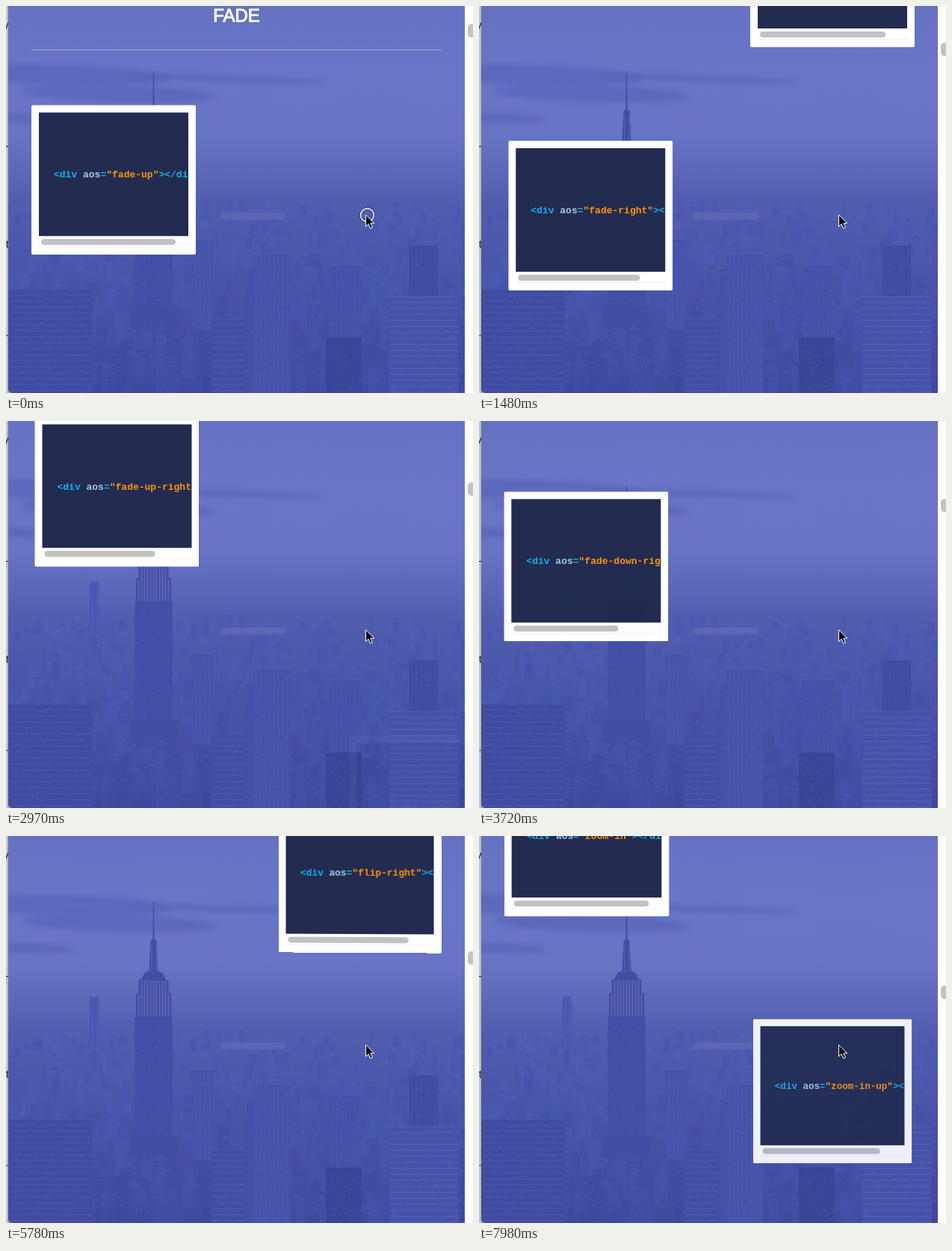
Recreate the animation shown at these times as an HTML page with a canvas. Size 625 by 517 pixels, loop 8000 ms.

```html
<!DOCTYPE html>
<html lang="en">
<head>
<meta charset="utf-8">
<title>Scroll animations</title>
<style>
  html, body { margin: 0; width: 100%; height: 100%; overflow: hidden; background: #fff; }
  #stage { position: relative; width: 625px; height: 517px; overflow: hidden; background: #fff; }
  #stage > *, #page > *, .card > * { position: absolute; }
  #edge { left: 0; top: 0; width: 12px; height: 517px; overflow: hidden;
    background: linear-gradient(90deg, #d2d2cb, #aeaeae 3px); font: 15px/18px "Liberation Sans", Arial, sans-serif; color: #222; }
  #edge span { position: absolute; right: 8px; }
  #city { left: 3px; top: 0; border-radius: 0 0 0 5px; }
  #page { left: 0; top: 0; width: 614px; height: 0; }
  .rule { left: 34px; width: 549px; height: 1px; background: rgba(255,255,255,.38); }
  .title { left: 34px; width: 549px; text-align: center; color: #fff;
    font: 24px/30px "Liberation Sans", Arial, sans-serif; -webkit-text-stroke: 1px #fff; }
  .card { width: 220px; height: 200px; background: #fff; border-radius: 2px; backface-visibility: hidden; }
  .code { left: 10px; top: 10px; width: 200px; height: 165px; overflow: hidden; background: #232b50; }
  .code pre { position: absolute; left: 20px; top: 76px; margin: 0; color: #12b2ee;
    font: bold 13px/15px "Liberation Mono", "Courier New", monospace; }
  .code b { color: #9fcbea; }
  .code i { color: #fb9408; font-style: normal; }
  .bar { left: 13px; top: 179px; height: 8px; border-radius: 4px; background: #c2c2c2; }
  .track { left: 10px; top: 189px; width: 200px; height: 1px; background: #f0f0f0; }
  #thumb { left: 618px; width: 12px; height: 18px; border-radius: 5px; background: #c3c3c3; }
  #pointer { left: 470px; top: 267px; }
</style>
</head>
<body>
<div id="stage">
  <div id="edge">
    <span style="top:18px">V</span><span style="top:183px">T</span>
    <span style="top:309px">t</span><span style="top:430px">·</span>
  </div>
  <canvas id="city" width="611" height="517"></canvas>
  <div id="page"></div>
  <div id="thumb"></div>
  <svg id="pointer" width="30" height="34">
    <g id="ring" fill="none"><circle cx="13.5" cy="12.5" r="10" stroke="#222a50"/><circle cx="13.5" cy="12.5" r="9" stroke="#fff" stroke-width="1.4"/></g>
    <path d="M11.5 12v15.5l3.6-3.3 2.5 6 2.8-1.2-2.5-5.8h4.8z" fill="#080808" stroke="#fff"/>
  </svg>
</div>
<script>
const $ = id => document.getElementById(id);
const page = $('page');

// ---------- Fixed city backdrop ----------
function paintCity() {
  const g = $('city').getContext('2d');
  let seed = 11;
  const rnd = (from = 0, to = 1) => from + (to - from) * (seed = seed * 16807 % 2147483647) / 2147483647;
  const tone = (light, alpha = 1) => `hsla(232,${66 - light * .5}%,${light}%,${alpha})`;
  const rect = (x, y, w, h, light, alpha) => {
    g.fillStyle = tone(light, alpha);
    g.fillRect(x, y, w, h);
  };
  g.translate(-3, 0);

  const sky = g.createLinearGradient(0, 0, 0, 517);
  ['#6572c2', '#6975c6', '#6874c4', '#525fb0', '#4a56a8', '#444fa2', '#3f4b9d']
    .forEach((color, i) => sky.addColorStop(i / 6, color));
  g.fillStyle = sky;
  g.fillRect(0, 0, 625, 517);

  const cloud = (x, y, rx, ry) => {
    g.fillStyle = tone(52, .6);
    g.beginPath();
    g.ellipse(x, y, rx, ry, .03, 0, 7);
    g.fill();
  };
  g.filter = 'blur(3px)';
  cloud(70, 92, 150, 13);
  cloud(150, 117, 130, 11);
  cloud(290, 97, 135, 4);
  cloud(30, 150, 60, 6);
  g.filter = 'none';

  const windows = (x, y, w, h, count) => {
    while (count-- > 0) rect(rnd(x, x + w), rnd(y, y + h), rnd(1, 3), 1, rnd(46, 58), .5);
  };

  // Blocks grow and darken from the horizon to the front
  for (let i = 0; i < 700; i++) {
    const depth = i / 700, w = rnd(4, 10 + 16 * depth), h = rnd(6, 18 + 50 * depth);
    const x = rnd(-10, 625), y = 258 + 235 * depth;
    rect(x, y, w, h, 50.5 - 6 * depth + rnd(-2.5, 2.5), .65);
    windows(x, y, w, h, w * h / 50);
  }
  rect(288, 276, 86, 9, 57, .5);

  // 'v' marks upright ribs, 'h' marks floors
  const building = (x, y, w, lattice, h = 517 - y, light = 54 - y / 45) => {
    rect(x, y, w, h, light);
    rect(x, y, w, 1, light + 7, .6);
    if (lattice === 'v') for (let i = 3; i < w - 1; i += 6) rect(x + i, y + 4, 1.5, h, light + 4, .5);
    if (lattice === 'h') for (let j = 7; j < h; j += 8) rect(x + 2, y + j, w - 4, 2, light + 6, .5);
    windows(x, y, w, h, w * h / 45);
  };
  building(112, 214, 12, 'v', 70);
  building(250, 311, 28, 'v', 120);
  building(322, 350, 14);
  building(331, 331, 50, 'v');
  building(433, 345, 42, 'v', 100);
  building(540, 319, 38, 'v', 70, 44);
  building(3, 378, 112, 'h', 139, 44);
  building(274, 418, 48, 'h');
  building(512, 388, 94, 'h', 129, 47);
  building(428, 442, 48, '', 75, 41);

  // Tall tower: height and half width from the spire down
  const profile = [[88, .5], [138, 1.2], [140, 4], [180, 6], [183, 12], [192, 17], [192, 20],
    [210, 20], [210, 23.5], [242, 23.5], [242, 25], [400, 25], [400, 32], [430, 32]];
  const axis = 197.5;
  g.fillStyle = tone(45);
  g.beginPath();
  profile.forEach(([y, half]) => g.lineTo(axis + half, y));
  profile.reverse().forEach(([y, half]) => g.lineTo(axis - half, y));
  g.fill();
  for (let x = -21; x <= 21; x += 4) {
    rect(axis + x, Math.abs(x) < 19 ? 193 : 212, 2, Math.abs(x) < 19 ? 48 : 29, 60, .5);
    rect(axis + x, 246, 1.5, 154, 50, .35);
  }
  rect(axis - 3, 145, 1, 36, 60, .6);
  rect(axis + 3, 145, 1, 36, 60, .6);
  windows(172, 245, 50, 185, 180);
}

// ---------- Page content ----------
const sections = {
  FADE: ['fade-up', 'fade-down', 'fade-right', 'fade-left',
    'fade-up-right', 'fade-up-left', 'fade-down-right', 'fade-down-left'],
  FLIP: ['flip-left', 'flip-right', 'flip-up', 'flip-down'],
  ZOOM: ['zoom-in', 'zoom-in-up']
};
const CARD_PITCH = 325, HEADER = 172, AFTER_CARDS = 43;
const cards = [];

function add(cls, top, html = '') {
  const el = document.createElement('div');
  el.className = cls;
  el.style.top = top + 'px';
  el.innerHTML = html;
  return page.appendChild(el);
}

function addCard(name, top, left) {
  const barWidth = 38800 / (20 + 7.8 * (18 + name.length));
  const el = add('card', top, `<div class="code"><pre>&lt;div <b>aos</b>=<i>"${name}"</i>&gt;&lt;/div&gt;</pre></div>
    <div class="bar" style="width:${barWidth}px"></div><div class="track"></div>`);
  el.style.left = left + 'px';
  cards.push({ name, el, start: stepAtScroll(top - TRIGGER) });
}

function buildPage() {
  let y = -31;
  for (const [title, names] of Object.entries(sections)) {
    add('rule', y);
    add('title', y + 29, title);
    add('rule', y + 89);
    y += HEADER;
    names.forEach((name, i) => addCard(name, y + i * CARD_PITCH, i % 2 ? 363 : 34));
    y += names.length * CARD_PITCH - AFTER_CARDS;
  }
}

// ---------- Motion, timed in steps of the choppy playback ----------
const LOOP = 8000, STEP = 147.7, FADE_STEPS = 6.75;
const TRIGGER = 370; // a card starts once its top is this far down the view
const scrollKeys = [[-4.4, -229], [0, 0], [10, 611], [17, 1071], [19.95, 1396], [20, 1442], [30, 2549],
  [38.95, 3150], [39, 3239], [43.9, 3475], [45, 3762], [54, 4392]];

function interpolate(keys, x, from, to) {
  const i = Math.max(1, keys.findIndex(key => key[from] >= x));
  const a = keys[i - 1], b = keys[i];
  return a[to] + (b[to] - a[to]) * (x - a[from]) / (b[from] - a[from]);
}
const scrollAt = step => interpolate(scrollKeys, step, 0, 1);
const stepAtScroll = y => interpolate(scrollKeys, y, 1, 0);

// cubic-bezier(.175, .885, .32, 1.275)
function easeOutBack(x) {
  if (x <= 0) return 0;
  if (x >= 1) return 1;
  const curve = (u, a, b) => 3 * (1 - u) ** 2 * u * a + 3 * (1 - u) * u * u * b + u ** 3;
  let lo = 0, hi = 1;
  for (let i = 0; i < 24; i++) {
    const mid = (lo + hi) / 2;
    if (curve(mid, .175, .32) < x) lo = mid; else hi = mid;
  }
  return curve(lo, .885, 1.275);
}

function pose({ name, start, el }, step) {
  const shown = easeOutBack((step - start) / FADE_STEPS), rest = 1 - shown;
  const has = word => name.includes('-' + word);
  const dx = 100 * rest * (has('left') - has('right'));
  const dy = 100 * rest * (has('up') - has('down'));
  if (name.startsWith('flip')) {
    el.style.transform = `perspective(2500px) rotateY(${-dx}deg) rotateX(${-dy}deg)`;
    return;
  }
  const scale = name.startsWith('zoom') ? 1 - .4 * rest : 1;
  el.style.transform = `translate(${dx}px,${dy}px) scale(${scale})`;
  el.style.opacity = Math.min(1, shown);
}

function render(now) {
  const step = Math.floor(now % LOOP / STEP);
  const y = Math.round(scrollAt(step));
  page.style.transform = `translateY(${-y}px)`;
  $('thumb').style.top = 24 + y * .0401 + 'px';
  $('ring').style.display = step ? 'none' : '';
  cards.forEach(card => pose(card, step));
}

paintCity();
buildPage();
const began = performance.now();
function tick() {
  render(performance.now() - began);
  requestAnimationFrame(tick);
}
tick();
</script>
</body>
</html>
```
